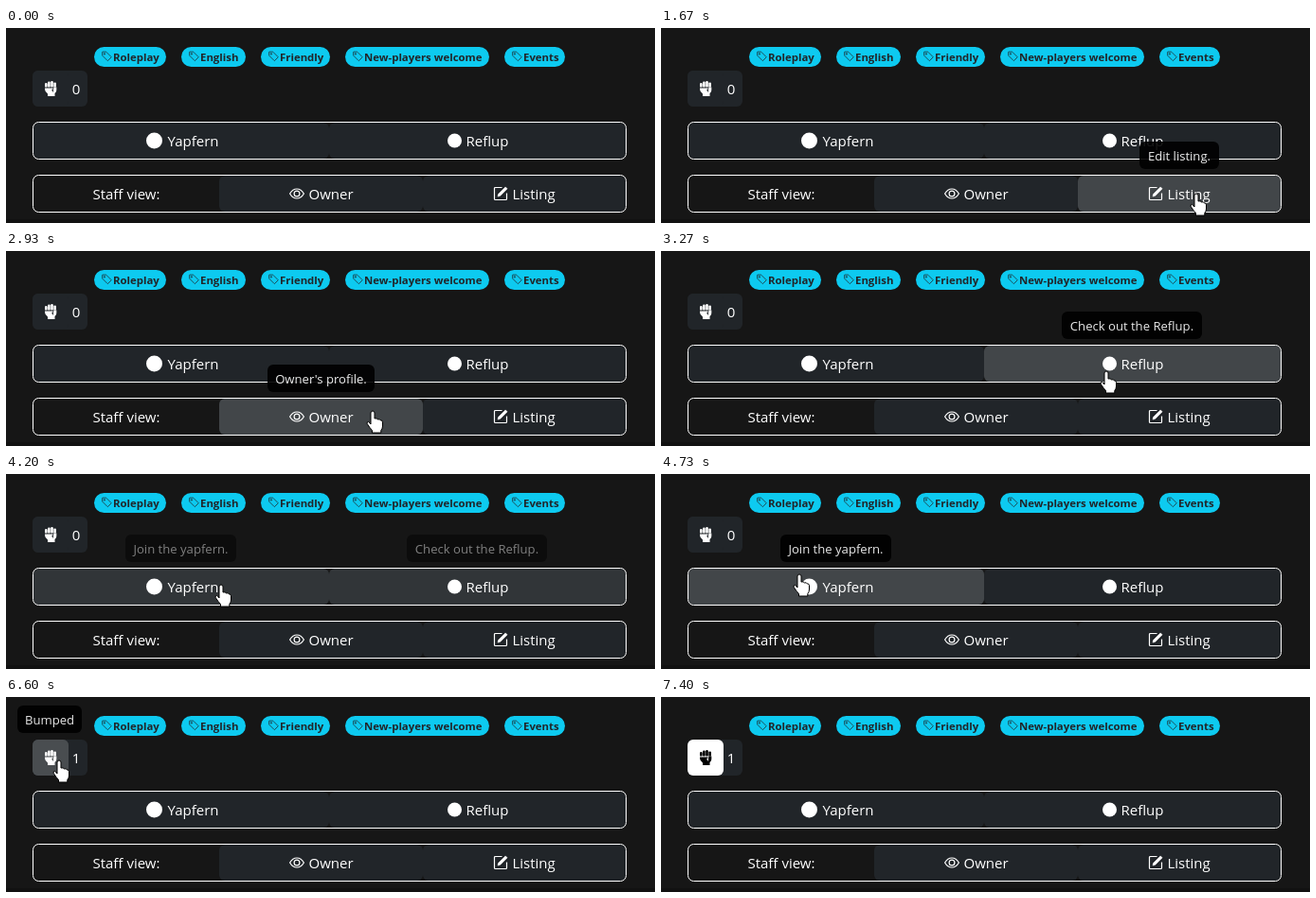
Write an HTML page that moves like this. It is 685x206 px and loops after 8540 ms.

```html
<!DOCTYPE html>
<html lang="en">
<head>
<meta charset="utf-8">
<style>
  html, body { margin: 0; width: 100%; height: 100%; overflow: hidden; background: #161616; }
  svg { display: block; font: 15px "Open Sans", sans-serif; fill: #fff; }
  .btn { fill: #212529; }
  .hover { fill: #424649; }
  .badge { font-size: 11.4px; font-weight: 700; fill: #212529; }
  .tip { font-size: 13.1px; text-anchor: middle; }
  .line { fill: none; stroke: #fff; }
  .mid { text-anchor: middle; }
</style>
</head>
<body>
<svg id="stage" width="685" height="206" viewBox="0 0 685 206"></svg>
<script>
const LOOP = 8540, STEP = 200 / 3, FADE = 150;

// Hover areas: box, time entered, time left
const buttons = {
  bump:    { box: [28, 45, 38, 38],    on: 5000, off: 7200 },
  chat:    { box: [29, 100, 312, 38],  on: 4125, off: 4740 },
  video:   { box: [341, 100, 313, 38], on: 3090, off: 4125 },
  owner:   { box: [225, 156, 215, 38], on: 1980, off: 2980 },
  listing: { box: [440, 156, 214, 38], on: 1000, off: 1960 },
};

// Tooltips: text, left, top, width, button, visible from, visible until
const tips = [
  ["Edit listing.", 505, 120, 84, "listing"],
  ["Owner's profile.", 276, 120, 113, "owner"],
  ["Check out the Reflup.", 423, 64, 148, "video"],
  ["Join the yapfern.", 126, 64, 117, "chat"],
  ["Bump server.", -1, 9, 96, "bump", 0, 6590],
  ["Bumped", 12, 9, 68, "bump", 6590, LOOP],
];

const badges = [
  ["Roleplay", 93, 76], ["English", 185, 68], ["Friendly", 269, 73],
  ["New-players welcome", 358, 152], ["Events", 526, 64],
];

// Pointer stops: time, x, y
const path = [
  [1000, 650, 181], [1200, 572, 180], [1600, 572, 180], [1667, 565, 175],
  [2133, 389, 172], [2867, 389, 172], [2933, 387, 169], [3200, 470, 127],
  [3870, 470, 127], [4330, 168, 115], [4600, 168, 115], [5070, 56, 67],
  [7133, 56, 67], [7200, 70, 60],
];

const rect = (x, y, w, h, attrs = "", r = 6) =>
  `<rect x="${x}" y="${y}" width="${w}" height="${h}" rx="${r}" ${attrs}/>`;
const text = (str, x, y, attrs = "") => `<text x="${x}" y="${y}" ${attrs}>${str}</text>`;

const badge = ([label, x, w]) => rect(x, 20, w, 21, 'fill="#0dcaf0"', 10.5) +
  `<g transform="translate(${x + 7.5} 24) scale(.75)" fill="none" stroke="#212529">
    <path d="M1.5 2q0-.5.5-.5h4.6q.3 0 .5.2l7 7q.3.3 0 .6l-4.7 4.7q-.3.3-.6 0l-7-7q-.3-.2-.3-.5z"/>
    <circle cx="4.5" cy="4.5" r="1"/></g>` +
  text(label, x + 20, 35, 'class="badge"');

const fist = `<g id="fist" transform="translate(41 56)">
  <path d="M0 7.4h8.5q.5 1.8-2 1.8q2 .2 1.8 2.3h.8q-.4-2 .2-3.4V6.4h3v3.4q0 2-1.8 3.2V16h-7.500v-2.600Q0 11 0 9z"/>
  ${[[0, 2], [3.1, .6], [6.2, 0], [9.300, 1.4]].map(([x, y]) => rect(x, y, 2.6, 6.6 - y, "", 1.2)).join("")}</g>`;

const eye = `<g class="line" transform="translate(299 167)">
  <path d="M.6 8Q3.500 3 8 3T15.400 8Q12.500 13 8 13T.6 8z" stroke-width="1.200"/>
  <circle cx="8" cy="8" r="2.900" stroke-width="1.200"/></g>`;

const pencil = `<g class="line" transform="translate(514 167)">
  <path d="M9.500 1.500H2.500q-1 0-1 1v11q0 1 1 1h11q1 0 1-1V7.500" stroke-width="1.200"/>
  <path d="M5 11l.8-2.700 7.400-7.400 1.900 1.900-7.400 7.400z" fill="#fff" stroke-width=".6"/></g>`;

const hand = `<path id="hand" stroke="#000" stroke-linejoin="round"
  d="M-2 14V2a2 2 0 0 1 4 0V8q2.500-.8 3.300.9 2.400-.7 3 1 2.200-.2 2.200 1.900V16q0 2.500-1.700 4.500V23H-.5V20.500Q-3 18-5.800 13.500q-.6-2.400 1.500-2.200z"/>`;

stage.innerHTML =
  rect(0, 0, 685, 206, 'fill="#161616"', 0) + rect(0, 202, 685, 4, 'fill="#111"', 0) +
  badges.map(badge).join("") +
  rect(28, 45, 58, 38, 'class="btn"') +
  Object.entries(buttons).map(([id, { box }]) =>
    rect(...box, 'class="btn"') + rect(...box, `class="hover" id="${id}"`)).join("") +
  rect(28, 45, 38, 38, 'id="pressed" fill="#4d5154"') +
  rect(28, 45, 38, 38, 'id="done" fill="#fff"') +
  [99.5, 155.5].map(y => rect(28.5, y, 626, 39, 'class="line"')).join("") +
  fist + text("0", 74, 69.5, 'id="count" class="mid"') +
  '<circle cx="156.500" cy="119" r="8.500"/>' + text("Yapfern", 170.5, 125) +
  '<circle cx="473.500" cy="119" r="7.500"/>' + text("Reflup", 485.5, 125) +
  text("Staff view:", 127, 181, 'class="mid"') +
  eye + text("Owner", 319.5, 181) + pencil + text("Listing", 534.5, 181) +
  tips.map(([label, x, y, w], i) => `<g id="tip${i}" class="tip">` +
    rect(x, y, w, 29, 'fill="#000"') + text(label, x + w / 2, y + 19.5) + "</g>").join("") +
  hand;

const el = id => document.getElementById(id);
const ramp = (t, start) => Math.min(1, Math.max(0, (t - start) / FADE));
const pulse = (t, on, off) => ramp(t, on) - ramp(t, off);
const smooth = u => u * u * (3 - 2 * u);

function pointerAt(t) {
  const next = path.findIndex(stop => stop[0] >= t);
  if (next < 1) return path[next < 0 ? path.length - 1 : 0].slice(1);
  const [t0, x0, y0] = path[next - 1], [t1, x1, y1] = path[next];
  const k = smooth((t - t0) / (t1 - t0));
  return [x0 + (x1 - x0) * k, y0 + (y1 - y0) * k];
}

function draw(now) {
  const t = Math.floor((now % LOOP + 4) / STEP) * STEP;
  const level = {};
  for (const [id, { on, off }] of Object.entries(buttons)) {
    level[id] = pulse(t, on, off);
    el(id).style.opacity = level[id];
  }
  tips.forEach(([, , , , id, from = 0, until = LOOP], i) => {
    el("tip" + i).style.opacity = t >= from && t < until ? 0.9 * level[id] : 0;
  });
  const done = ramp(t, 7200), shade = Math.round(255 * (1 - done));
  el("pressed").style.opacity = pulse(t, 6150, 6550);
  el("done").style.opacity = done;
  el("fist").style.fill = `rgb(${shade},${shade},${shade})`;
  el("count").textContent = t < 6590 ? 0 : 1;
  el("hand").style.opacity = t > 999 && t < 7250 ? 1 : 0;
  el("hand").setAttribute("transform", `translate(${pointerAt(t).map(Math.round)})`);
  requestAnimationFrame(() => draw(performance.now() - start));
}

const start = performance.now();
draw(0);
</script>
</body>
</html>
```
